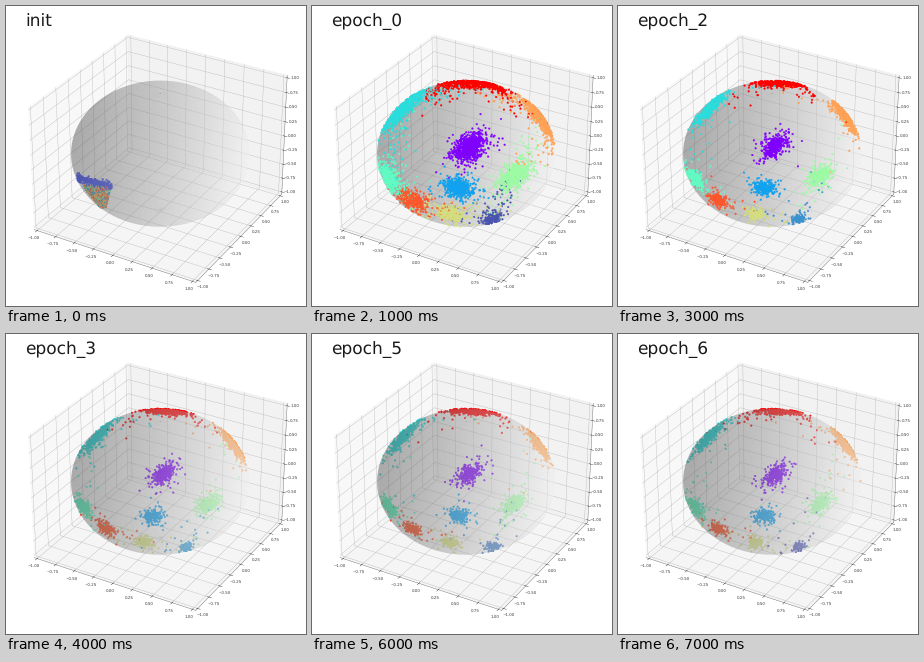
A matplotlib script that plays this animation: 300x300 px, repeating every 8000 ms.

```python
import numpy as np
import matplotlib.pyplot as plt
from matplotlib.animation import FuncAnimation

SIZE, DPI = 300, 30
LIM = 25 / 24
LAST = 6                                  # final epoch
TILT = np.array([0.5, 0.75 * np.sqrt(0.75)])
TILT /= np.hypot(*TILT)                   # view tilt on the flattened sphere

# Class homes as (angle, distance) about HUB, on the unit disc the sphere projects to.
HUB = np.array([0.03, 0.08])
HOME = {0: (-38, 0), 1: (-75, 0.99), 2: (-102, 0.55), 3: (144, 0.89), 4: (-154, 0.97),
        5: (-39, 0.62), 6: (-103, 0.91), 7: (28, 0.88), 8: (-131, 0.94), 9: (87, 0.87)}
RING = sorted((k for k in HOME if HOME[k][1] > 0.6), key=lambda k: HOME[k][0])
PALETTE = plt.get_cmap("rainbow")(np.linspace(0, 1, len(HOME)))[:, :3]
INDIGO, STEEL = np.array([0.29, 0.33, 0.69]), np.array([0.22, 0.61, 0.83])


def on_sphere(disc):
    """Lift disc positions to the near side; overshoot wraps round the limb."""
    rho = np.hypot(*disc.T)
    back = rho > 1
    a, q = disc.T / np.where(back, rho ** 2, 1)
    d = np.sqrt(np.maximum(0, 1 - a * a - q * q)) * np.where(back, -1, 1)
    b = q * TILT[0] - d * TILT[1]
    z = q * TILT[1] + d * TILT[0]
    c, s = np.cos(np.pi / 6), np.sin(np.pi / 6)
    return c * a - s * b, s * a + c * b, z


def home(k):
    angle, dist = HOME[k]
    t = np.radians(angle)
    return HUB + dist * np.array([np.cos(t), np.sin(t)])


def cluster(rng, k, epoch):
    """Points stretched along the tangent, flatter the nearer the limb."""
    t = np.radians(HOME[k][0])
    center = home(k)
    depth = np.sqrt(max(0, 1 - center @ center))
    grow = 0.85 + 0.35 * np.exp(-epoch)
    length = (0.07 + 0.06 * np.sin(t) + 0.06 * depth) * grow
    width = (0.015 + 0.04 * depth) * grow
    n = int((350 + 300 * np.exp(-epoch / 1.5)) * min(1.2, length / 0.09))
    tail = np.exp(rng.normal(0, 0.35, n))
    u, v = rng.normal(0, length, n) * tail, rng.normal(0, width, n) * tail
    along, across = np.array([-np.sin(t), np.cos(t)]), np.array([np.cos(t), np.sin(t)])
    return center + np.outer(u, along) + np.outer(v, across)


def strays(rng, epoch):
    """Scattered points between neighbouring classes, fewer as training goes on."""
    n = int(130 + 420 * np.exp(-1.5 * epoch))
    i = rng.integers(len(RING), size=n)
    ring = np.array(RING)
    first, second = ring[i], ring[(i + 1) % len(ring)]
    homes = np.array([home(k) for k in range(len(HOME))])
    mix = rng.random((n, 1))
    pts = (1 - mix) * homes[first] + mix * homes[second] + rng.normal(0, 0.09, (n, 2))
    return pts, np.where(rng.random(n) < 0.6, first, second)


def start_points(rng):
    """The untrained wedge: an indigo band over a mixed, narrowing patch."""
    n = 300
    u = rng.random(n)
    band = np.column_stack([-0.92 + 0.4 * u, -0.34 - 0.1 * u + rng.normal(0, 0.025, n)])
    down = rng.beta(1.3, 1.5, 2 * n)
    side = rng.uniform(-1, 1, 2 * n) * 0.17 * (1 - 0.8 * down)
    patch = np.column_stack([-0.69 + 0.06 * down + side, -0.43 - 0.31 * down])
    mixed = rng.choice([8, 8, 7, 7, 2, 4, 6], 2 * n)
    return np.vstack([band, patch]), np.append(np.ones(n, int), mixed)


def epoch_points(rng, epoch):
    groups = [cluster(rng, k, epoch) for k in HOME]
    kinds = np.repeat(list(HOME), [len(g) for g in groups])
    pts, extra = strays(rng, epoch)
    return np.vstack([pts, *groups]), np.append(extra, kinds)


plt.rcParams["text.hinting"] = "none"
plt.rcParams["text.hinting_factor"] = 1
fig = plt.figure(figsize=(SIZE / DPI, SIZE / DPI), dpi=DPI, facecolor="white")
ax = fig.add_axes([0.021, 0.018, 0.96, 0.96], projection="3d", computed_zorder=False)
ax.view_init(elev=30, azim=-60)
ticks = np.linspace(-1, 1, 9)
ax.set(xticks=ticks, yticks=ticks, zticks=ticks)
ax.tick_params(labelcolor="0.25")
for axis in (ax.xaxis, ax.yaxis, ax.zaxis):
    axis.line.set_color("0.3")

phi, theta = np.mgrid[0:np.pi:100j, 0:2 * np.pi:100j]
ax.plot_surface(np.sin(phi) * np.cos(theta), np.sin(phi) * np.sin(theta), np.cos(phi),
                rstride=1, cstride=1, color="w", alpha=0.28, linewidth=0, zorder=2)
title = fig.text(19.5 / SIZE, 1 - 20 / SIZE, "", fontsize=40, color="0.1")
cloud = []


def update(i):
    while cloud:
        cloud.pop().remove()
    rng = np.random.default_rng(20 + i)
    epoch = i - 1
    disc, kinds = start_points(rng) if i == 0 else epoch_points(rng, epoch)
    colors = PALETTE.copy()
    if i > 0:
        colors[1] = INDIGO + (STEEL - INDIGO) * np.sin(np.pi * epoch / LAST)
    veiled = i == 0 or i >= 4            # points drawn beneath the sphere
    cloud.append(ax.scatter(*on_sphere(disc), c=colors[kinds], s=18, linewidths=0.7,
                            depthshade=False, zorder=1 if veiled else 3))
    ax.set(xlim=(-LIM, LIM), ylim=(-LIM, LIM), zlim=(-LIM, LIM))
    title.set_text("init" if i == 0 else f"epoch_{epoch}")
    return cloud


anim = FuncAnimation(fig, update, frames=LAST + 2, interval=1000, repeat=True,
                     repeat_delay=0, init_func=lambda: [], blit=False)
plt.show()
```
